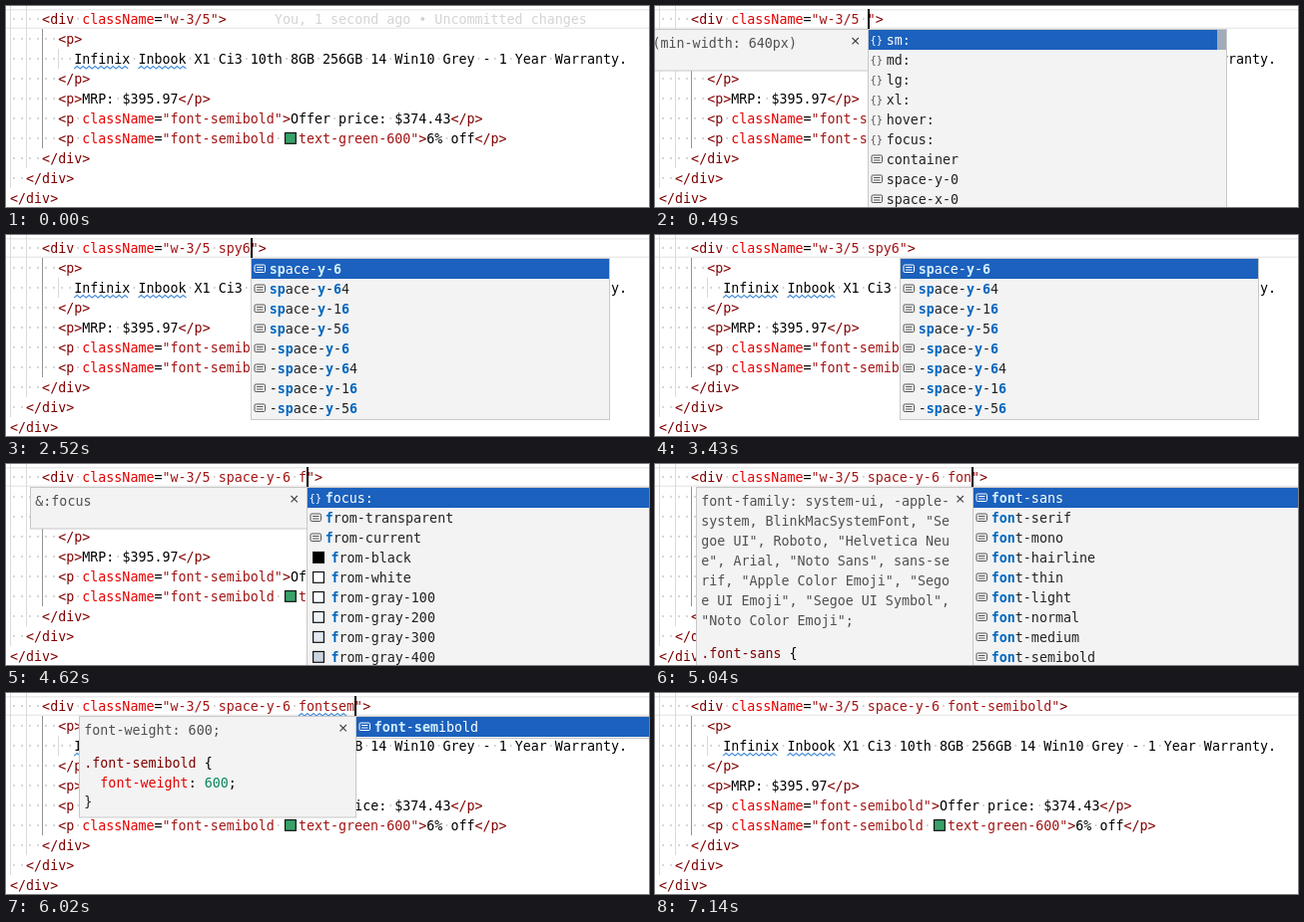
An HTML page that plays this animation: 644 px wide and 202 px high, repeating every 7490 ms.

```html
<!DOCTYPE html>
<html lang="en">
<head>
<meta charset="utf-8">
<title>Typing utility classes</title>
<style>
  html, body { margin: 0; width: 100%; height: 100%; overflow: hidden; background: #fff; }
  svg { display: block; width: 644px; height: 202px; }
  text { font: 13.33px "DejaVu Sans Mono", "Liberation Mono", monospace; white-space: pre; }
</style>
</head>
<body>
<svg id="stage" viewBox="0 0 644 202" xmlns="http://www.w3.org/2000/svg"></svg>
<script>
const stage = document.getElementById('stage');
const LOOP = 7490, TICK = 70, BLINK = 500;
const CHAR = 8.027, LEFT = 4, ROW = 20, BASE = 4.5;
const TAG = '#800000', ATTR = '#e50000', STR = '#a31515', DOT = '#d0d0d0';

const colX = col => LEFT + col * CHAR;
const rowY = row => 13 + row * ROW;   // vertical centre of a code row
const esc = s => s.replace(/&/g, '&amp;').replace(/</g, '&lt;');
const rect = (x, y, w, h, fill, extra = '') =>
  `<rect x="${x}" y="${y}" width="${w}" height="${h}" fill="${fill}" ${extra}/>`;
const span = (s, fill, bold) =>
  `<tspan fill="${fill}"${bold ? ' font-weight="bold"' : ''}>${esc(s)}</tspan>`;
const text = (x, y, body, size) =>
  `<text x="${x}" y="${y + BASE}"${size ? ` style="font-size:${size}px"` : ''}>${body}</text>`;
const stroke = (d, color, w = 1) =>
  `<path d="${d}" fill="none" stroke="${color}" stroke-width="${w}"/>`;

// ---------- code ----------
const ROWS = [
  null,
  '      <p>',
  '        Infinix Inbook X1 Ci3 10th 8GB 256GB 14 Win10 Grey - 1 Year Warranty.',
  '      </p>',
  '      <p>MRP: $395.97</p>',
  '      <p className="font-semibold">Offer price: $374.43</p>',
  '      <p className="font-semibold @text-green-600">6% off</p>',
  '    </div>',
  '  </div>',
  '</div>'
];

const dotted = (s, fill) => s.split(/( +)/).filter(Boolean)
  .map(p => p[0] === ' ' ? span('·'.repeat(p.length), DOT) : span(p, fill)).join('');

function paint(code) {
  const token = /(<\/?\w+|>)|(className)|("[^"]*"?|^@[^"]*")|([^<>"=]+?(?=className|[<>"=]|$))|(.)/g;
  return [...code.matchAll(token)].map(m =>
    dotted(m[0].replace('@', ''), m[1] ? TAG : m[2] ? ATTR : m[3] ? STR : '#000')).join('');
}

const swatch = (x, y, fill) => rect(x, y - 5.5, 10.8, 10.8, fill, 'stroke="#111" stroke-width="1.2"');

function codeRow(code, row) {
  const y = rowY(row), cut = code.indexOf('@');
  if (cut < 0) return text(LEFT, y, paint(code));
  const x = colX(cut);
  return text(LEFT, y, paint(code.slice(0, cut))) +
    swatch(x + 2.6, y, '#38a169') + text(x + 16, y, paint(code.slice(cut)));
}

function guide(col, from, to, color = '#dadada') {
  return rect(Math.floor(colX(col)), from, 1, to - from, color);
}

function squiggle(col, len, row) {
  const x0 = colX(col), x1 = colX(col + len), y = rowY(row) + 10;
  let d = `M${x0} ${y}`;
  for (let x = x0 + 3, up = true; x <= x1; x += 3, up = !up) d += `L${x} ${up ? y - 2.5 : y}`;
  return stroke(d, '#4a90d9', 1.1);
}

// ---------- suggestions ----------
const list = s => s.split(' ');
const prefixed = (prefix, s) => list(s).map(n => prefix + n);
const SHADES = { 'from-black': '#000', 'from-white': '#fff', 'from-gray-100': '#f7fafc',
  'from-gray-200': '#edf2f7', 'from-gray-300': '#e2e8f0', 'from-gray-400': '#cbd5e0' };
const spaces = list('0 1 2 3 4').flatMap(n => ['space-y-' + n, 'space-x-' + n]);
const spaceY = prefixed('space-y-', '0 1 2 3 4 5 6 8 10');
const six = prefixed('space-y-', '6 64 16 56');
const fonts = prefixed('font-', 'sans serif mono hairline thin light normal medium semibold');
const variants = [...list('sm: md: lg: xl: hover: focus: container'), ...spaces.slice(0, 2)];
const fromList = ['focus:', 'from-transparent', 'from-current', ...Object.keys(SHADES)];

const DOCS = {
  media: { detail: ['@media (min-width: 640px)'], css: [] },
  focus: { detail: ['&:focus'], css: [] },
  sans: {
    detail: ['font-family: system-ui, -apple-', 'system, BlinkMacSystemFont, "Se',
      'goe UI", Roboto, "Helvetica Neu', 'e", Arial, "Noto Sans", sans-se',
      'rif, "Apple Color Emoji", "Sego', 'e UI Emoji", "Segoe UI Symbol",', '"Noto Color Emoji";'],
    css: ['.font-sans {']
  },
  serif: {
    detail: ['font-family: Georgia, Cambria, ', '"Times New Roman", Times, serif', ';'],
    css: ['.font-serif {', '  font-family: Georgia, Cambria', ', "Times New Roman", Times,', '  serif;', '}']
  },
  semibold: {
    detail: ['font-weight: 600;'],
    css: ['.font-semibold {', '  font-weight: 600;', '}']
  }
};

// Marks the typed letters, in order, inside a suggestion.
function marked(item, word, selected) {
  let i = 0;
  return [...item].map(ch => {
    const hit = ch === word[i];
    if (hit) i++;
    return span(ch, selected ? (hit ? '#d3efff' : '#fff') : hit ? '#0066bf' : '#222', hit);
  }).join('');
}

function itemIcon(item, x, y, color) {
  if (item.endsWith(':')) return text(x + 2.5, y - 1, span('{}', color), 10.5);
  if (SHADES[item]) return swatch(x + 6.6, y, SHADES[item]);
  return rect(x + 4, y - 4, 10.5, 7.5, 'none', `rx="1.2" stroke="${color}"`) +
    stroke(`M${x + 6} ${y - 1.5}h6.5M${x + 6} ${y + 1}h6.5`, color);
}

function suggest(x, { items, word = '', thumb }) {
  const h = items.length > 8 ? 200 : items.length * ROW + 2;
  let out = rect(x + .5, 23.5, 359, h, '#f3f3f3', 'stroke="#c8c8c8"');
  out += rect(x + 1, 24, 358, ROW, '#1b61bd');
  items.forEach((item, i) => {
    const y = 34 + i * ROW;
    const letters = item[0] === 'f' && item.startsWith('from-t') && word === 'fonts' ? 'fotns' : word;
    out += itemIcon(item, x, y, i ? '#555' : '#fff') +
      text(x + (SHADES[item] ? 24.5 : 18.7), y, marked(item, letters, !i));
  });
  if (thumb) out += rect(x + 350, 24, 9, thumb, '#b9b9b9', 'opacity=".85"');
  return out;
}

function cssLine(s) {
  const rule = s.match(/^(\s+[\w-]+)(: )(\d+)(;)$/);
  if (rule) return span(rule[1], ATTR) + span(rule[2], '#000') + span(rule[3], '#098658') + span(';', '#000');
  const head = s.match(/^(\.\S+)(.*)$/);
  return head ? span(head[1], TAG) + span(head[2], '#000') : span(s, '#222');
}

function details(right, { detail, css }) {
  const x = right - 277, n = detail.length, cx = right - 12.5;
  let out = rect(x + .5, 23.5, 277, 22 + ROW * (n + css.length) - .5, '#f3f3f3', 'stroke="#c8c8c8"');
  detail.forEach((s, i) => out += text(x + 5.3, 37 + i * ROW, span(s, '#505050')));
  css.forEach((s, i) => out += text(x + 5.3, 37 + ROW * (n - 1) + 33.5 + i * 19.7, cssLine(s)));
  return out + stroke(`M${cx - 3} 32l6.4 6.4m0 -6.4l-6.4 6.4`, '#424242', 1.1);
}

// ---------- timeline ----------
const OPEN = '    <div className="';
const sp6 = 'w-3/5 space-y-6';
const media = { items: variants, doc: 'media', thumb: 20 };
const font = (at, word, items, doc, wavy) => ({ at, typed: sp6 + ' ' + word, word, items, doc, wavy });
const STATES = [
  { at: 0, typed: 'w-3/5', blame: true, still: true },
  { at: 280, typed: 'w-3/5', blame: true },
  { at: 350, typed: 'w-3/5 ', blame: true },
  { at: 420, typed: 'w-3/5 ' },
  { at: 490, typed: 'w-3/5 ', ...media },
  { at: 840, typed: 'w-3/5 s', word: 's', items: ['sm:', ...spaces.slice(0, 8)], doc: 'media', thumb: 20 },
  { at: 1470, typed: 'w-3/5 sp', word: 'sp', items: spaces.slice(0, 9), thumb: 29 },
  { at: 1810, typed: 'w-3/5 spy', word: 'spy', items: spaceY, thumb: 60 },
  { at: 2510, typed: 'w-3/5 spy6', word: 'spy6', items: [...six, ...six.map(s => '-' + s)] },
  { at: 3490, typed: sp6 },
  { at: 4340, typed: sp6 + ' ' },
  { at: 4410, typed: sp6 + ' ', ...media },
  font(4550, 'f', fromList, 'focus'),
  font(4830, 'fo', ['focus:', ...fonts.slice(0, 8)], 'focus'),
  font(5040, 'fon', fonts, 'sans'),
  font(5250, 'font', fonts, 'sans'),
  font(5600, 'fonts', ['font-sans', 'font-serif', 'font-semibold', 'from-transparent'], 'sans'),
  font(5880, 'fontse', ['font-serif', 'font-semibold'], 'serif'),
  font(5950, 'fontse', ['font-serif', 'font-semibold'], 'serif', 6),
  font(6020, 'fontsem', ['font-semibold'], 'semibold', 6),
  font(6160, 'fontsem', ['font-semibold'], 'semibold', 7),
  { at: 6570, typed: sp6 + ' font-semibold', wavy: 7 },
  { at: 6790, typed: sp6 + ' font-semibold' }
];
// The caret blinks from the moment the text last changed.
STATES.forEach((s, i) => {
  const prev = STATES[i - 1];
  s.since = prev && !prev.still && prev.typed === s.typed ? prev.since : s.at;
});

const backdrop =
  rect(0, 0, 644, 202, '#fff') +
  rect(0, 3, 644, 1.5, '#ebebeb') + rect(0, 21.5, 644, 1.5, '#ebebeb') +
  guide(0, 0, 183) + guide(2, 0, 163) + guide(4, 23, 143, '#939393') + guide(6, 43, 63) +
  ROWS.map((code, row) => code ? codeRow(code, row) : '').join('') +
  squiggle(8, 7, 2) + squiggle(16, 6, 2);

function draw(s, caret) {
  const line = OPEN + s.typed + '">';
  const x = colX(OPEN.length + s.typed.length);
  let out = backdrop + codeRow(line, 0);
  if (s.blame) out += text(colX(line.length + 6), rowY(0), span('You, 1 second ago • Uncommitted changes', '#d4d4d4'));
  if (s.wavy) out += squiggle(OPEN.length + sp6.length + 1, s.wavy, 0);
  if (s.doc) out += details(Math.ceil(x), DOCS[s.doc]);
  if (s.items) out += suggest(Math.ceil(x), s);
  if (caret) out += rect(Math.round(x), 3, 2, ROW, '#000');
  stage.innerHTML = out;
}

let shown = '';
function update(now) {
  const t = Math.floor(now % LOOP / TICK) * TICK;
  const i = STATES.findLastIndex(s => s.at <= t), s = STATES[i];
  const caret = !s.still && (t - s.since) % (2 * BLINK) < BLINK;
  const key = i + '/' + caret;
  if (key !== shown) { draw(s, caret); shown = key; }
}

const start = performance.now();
function loop() {
  update(performance.now() - start);
  requestAnimationFrame(loop);
}
loop();
</script>
</body>
</html>
```
